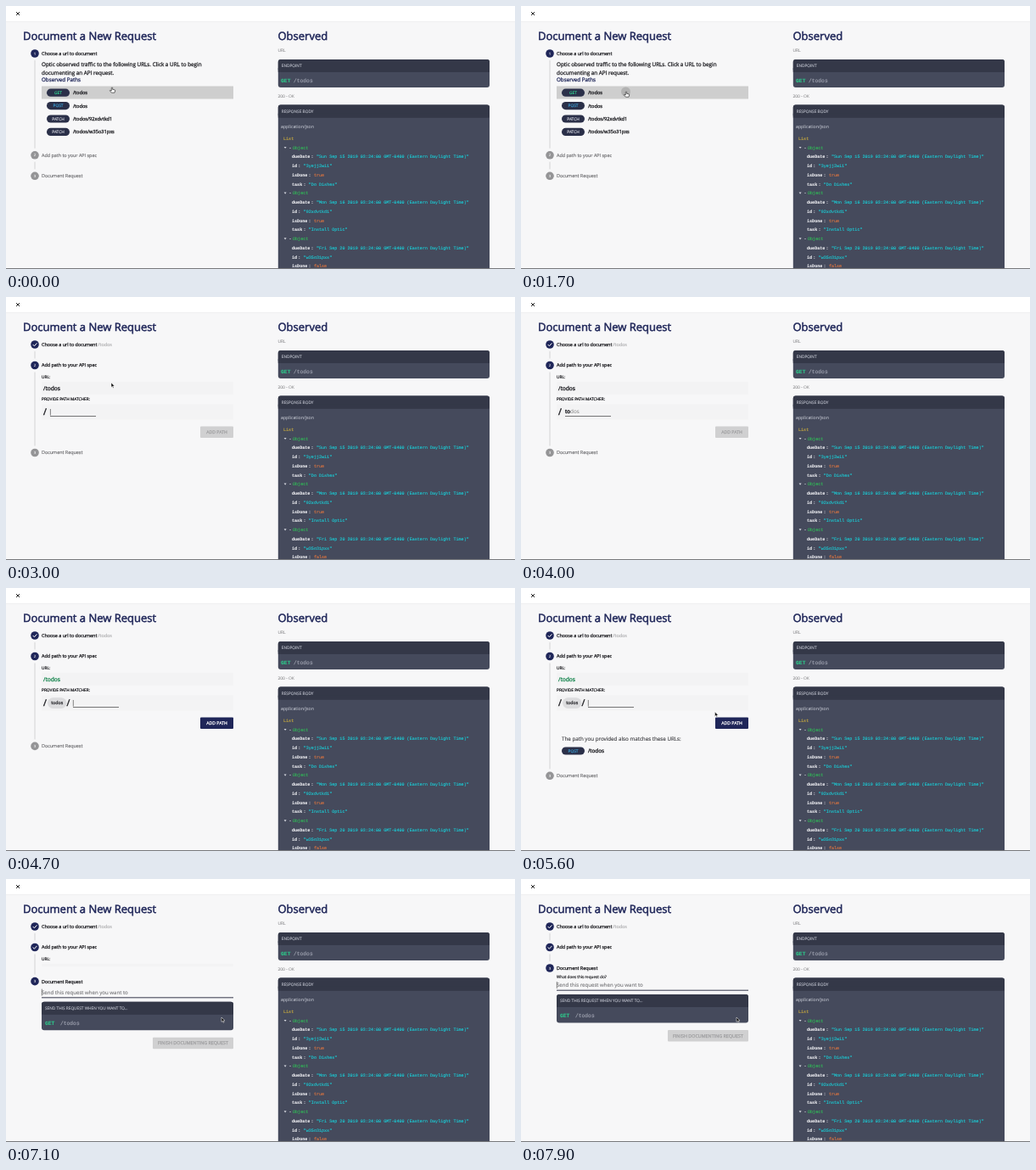
An HTML page for the animation above (8 s loop, 600 by 310 pixels).

```html
<!DOCTYPE html>
<html lang="en">
<head>
<meta charset="utf-8">
<title>Document a New Request</title>
<style>
  html, body { margin: 0; width: 100%; height: 100%; overflow: hidden; background: #f7f7f8; }
  svg { display: block; }
  text { font-family: "Open Sans", "Noto Sans", sans-serif; text-rendering: geometricPrecision; white-space: pre; }
  .mono { font-family: "Liberation Mono", monospace; }
</style>
</head>
<body>
<svg width="600" height="310" viewBox="0 0 600 310">
  <g id="fixed"></g>
  <g id="live"></g>
</svg>
<script>
const LOOP = 8000;
const NAVY = '#1f2659', INK = '#1c1c20', GREY = '#8e8e90', HEAD = '#343848', BODY = '#454a5c';
const FIELD = '#f3f3f4', GREEN = '#2fc48a', CYAN = '#19d3dc';

// Drawing helpers, each returning SVG markup
const rect = (x, y, w, h, fill, r = 0) =>
  `<rect x="${x}" y="${y}" width="${w}" height="${h}" rx="${r}" fill="${fill}"/>`;
const line = (d, color, w = 0.6) =>
  `<path d="${d}" stroke="${color}" stroke-width="${w}" fill="none"/>`;
const text = (x, y, size, fill, s, heavy = 2, attrs = '') =>
  `<text x="${x}" y="${y}" font-size="${size}" fill="${fill}" stroke="${fill}" stroke-width="${heavy * size / 100}" ${attrs}>${s}</text>`;
const mono = (x, y, size, fill, s, bold) =>
  text(x, y, size, fill, s, 2, `class="mono" font-weight="${bold ? 700 : 400}"`);
const centered = (x, y, size, fill, s, heavy) => text(x, y, size, fill, s, heavy, 'text-anchor="middle"');
const shift = (dy, content) => `<g transform="translate(0 ${dy})">${content}</g>`;
const clip = (y, h, content) => h <= 0 ? '' :
  `<svg y="${y}" width="300" height="${h}" viewBox="0 ${y} 300 ${h}">${content}</svg>`;

const ease = (t, from, to) => {
  const u = Math.min(1, Math.max(0, (t - from) / (to - from)));
  return u * u * (3 - 2 * u);
};

const card = (x, y, w, h, title) =>
  rect(x, y, w, h, BODY, 3) + rect(x, y, w, 15, HEAD, 3) + rect(x, y + 10, w, 5, HEAD) +
  text(x + 4, y + 9.3, 4.75, '#a9acb8', title, 4);

const chip = (y, method, color) =>
  rect(48, y - 4.6, 27, 9.2, '#2b3049', 4.6) + centered(61.5, y + 1.8, 4.8, color, method, 4);

const button = (x, y, w, label, size, active) =>
  rect(x, y, w, 13.5, active ? NAVY : '#d0d0d1', 1) +
  centered(x + w / 2, y + 8.7, size, active ? '#fff' : '#a0a0a2', label, 5);

function response() {
  const tasks = [
    ['Sun Sep 15', '3yejj2wi1', true, 'Do Dishes'],
    ['Mon Sep 16', '92xdvtkd1', true, 'Install Optic'],
    ['Fri Sep 20', 'w35o31pxs', false, '']
  ];
  let out = mono(327, 158, 5.08, '#d2b23c', 'List');
  let y = 168.7;
  for (const [day, id, done, task] of tasks) {
    out += `<path d="M327.6 ${y - 2.8}h3l-1.5 2.2z" fill="#d4d6de"/>` +
      mono(333.5, y, 5.08, '#f4f4f7', '-') + mono(338, y, 5.08, '#2fc457', 'Object');
    const fields = {
      dueDate: `"${day} 2019 03:24:00 GMT-0400 (Eastern Daylight Time)"`,
      id: `"${id}"`, isDone: done, task: task && `"${task}"`
    };
    for (const [key, value] of Object.entries(fields)) {
      y += 10.74;
      if (value === '') continue;
      const end = 337 + key.length * 3.05;
      out += mono(337, y, 5.08, '#f4f4f7', key, true) + mono(end + 1.2, y, 5.08, '#f4f4f7', ':', true) +
        mono(end + 7.6, y, 5.08, key === 'isDone' ? '#e8793f' : CYAN, value);
    }
    y += 10.74;
  }
  return out;
}

function fixedParts() {
  return rect(0, 0, 600, 310, '#f7f7f8') + rect(0, 0, 600, 18.5, '#fff') +
    line('M0 18.5H600', '#ececee', 0.7) +
    line('M12 7l4 4m0-4l-4 4', '#111', 0.9) +
    text(20, 39.6, 13, NAVY, 'Document a New Request', 4) +
    text(320.5, 39.6, 13, NAVY, 'Observed', 4) +
    text(320.5, 54.2, 4.8, GREY, 'URL') +
    card(320.8, 63, 249.2, 33, 'ENDPOINT') +
    mono(324, 90.2, 6.4, GREEN, 'GET', true) + mono(339, 90.2, 6.3, '#a0a4b2', '/todos') +
    text(320.5, 107.8, 4.9, GREY, '200 - OK') +
    card(320.8, 116.6, 249.2, 200, 'RESPONSE BODY') +
    text(324, 143.7, 5.22, '#b9bcc7', 'application/json') +
    response() + rect(0, 309, 600, 1, '#77787c');
}

function step(n, y, label, state) {
  const on = state !== 'idle';
  const mark = state === 'done'
    ? line(`M31.7 ${y}l1.7 1.8 3-3.4`, '#fff', 1)
    : centered(34, y + 1.6, 4.4, '#fff', n);
  return `<circle cx="34" cy="${y}" r="4.8" fill="${on ? NAVY : '#949496'}"/>` + mark +
    text(42, y + 1.9, 5.42, on ? INK : '#6f6f72', label, on ? 5 : 3);
}

const caret = (x, y, h, t, start) =>
  (t - start) % 1000 < 500 ? line(`M${x} ${y}v${h}`, '#333', 0.6) : '';

function pathList(t) {
  const rows = [['GET', GREEN, '/todos'], ['POST', '#3a9bd0', '/todos'],
    ['PATCH', '#c3c5d0', '/todos/92xdvtkd1'], ['PATCH', '#c3c5d0', '/todos/w35o31pxs']];
  const grow = ease(t, 1500, 1700);
  return text(42, 70.8, 6.34, INK, 'Optic observed traffic to the following URLs. Click a URL to begin', 4) +
    text(42, 81.2, 6.34, INK, 'documenting an API request.', 4) +
    text(42, 89.1, 6.25, NAVY, 'Observed Paths', 4) +
    rect(42, 94.5, 226, 15, '#cecece') +
    (grow ? `<circle cx="123.5" cy="101" r="${5.5 * grow}" fill="#b2b2b2"/>` : '') +
    rows.map(([method, color, path], i) => {
      const y = 102.2 + i * 15.4;
      return chip(y, method, color) + text(79, y + 2, 5.65, INK, path, 5);
    }).join('');
}

function pathForm(t) {
  const matched = t >= 4600;
  const typed = [3600, 3900, 4200, 4300, 4450].filter(k => t >= k).length;
  const word = 'todos', x = matched ? 79 : 52;
  const slash = x => text(x, 139.4, 10.5, INK, '/', 4);
  let out = text(42, 95.9, 4.75, INK, 'URL:', 5) + rect(42, 100, 226, 15, FIELD) +
    text(44, 109.8, 6.6, matched ? '#17864f' : INK, '/todos', 5) +
    text(42, 122.4, 4.8, INK, 'PROVIDE PATH MATCHER:', 5) + rect(42, 126.5, 226, 18, FIELD) +
    slash(44) + line(`M${x} 140.5h54`, '#555', 0.8);
  if (matched) {
    out += rect(49, 129.3, 22.5, 12.6, '#dcdcde', 6.3) + centered(60.2, 137.4, 5.3, INK, word, 4) +
      slash(71.5) + caret(79.3, 132, 7.5, t, 4600);
  } else if (typed) {
    out += text(52, 137.4, 6.3, INK,
      `${word.slice(0, typed)}<tspan fill="#777" stroke="none">${word.slice(typed)}</tspan>`, 6);
  } else {
    out += caret(52.4, 132, 7.5, t, 2000);
  }
  return out + button(229, 152.4, 39, 'ADD PATH', 5.2, matched) + (matched
    ? text(48, 180.4, 6.24, '#3a3a3e', 'The path you provided also matches these URLs:') +
      chip(192, 'POST', '#3a9bd0') + text(79, 194.2, 6.3, INK, '/todos', 5)
    : '');
}

function requestForm(t) {
  const label = ease(t, 7100, 7300);
  return (label ? `<g opacity="${label}">${text(42, 117.2, 4.65, INK, 'What does this request do?', 4)}</g>` : '') +
    shift(-7 * (1 - label),
      text(42, 127.2, 6.1, '#77777a', 'Send this request when you want to') +
      caret(42.3, 121, 8, t, 6900) + line('M42 131.2h226', '#33364a', 1) +
      card(42, 136, 226, 33.5, 'SEND THIS REQUEST WHEN YOU WANT TO...') +
      mono(46, 163.2, 6.3, GREEN, 'GET', true) + mono(64, 163.2, 6.3, '#a0a4b2', '/todos') +
      button(173, 178, 95, 'FINISH DOCUMENTING REQUEST', 5.4, false));
}

function steps(t) {
  const first = 95.3 * (1 - ease(t, 1750, 2050));
  const second = (78.5 * ease(t, 1750, 2050) + 37.8 * ease(t, 4650, 4950)) * (1 - ease(t, 6850, 7176));
  const third = 90 * ease(t, 6850, 7080);
  const y2 = 80.5 + first, y3 = y2 + 24.5 + second;
  const chosen = t >= 1750, added = t >= 6850;
  return line(`M34 64V${y2 - 8}M34 ${y2 + 8}V${y3 - 8}`, '#bcbcbe') +
    step(1, 56, 'Choose a url to document', chosen ? 'done' : 'active') +
    (chosen ? text(108.5, 57.9, 5.42, '#a4a4a6', '/todos') : '') +
    clip(61, first, pathList(t)) +
    step(2, y2, 'Add path to your API spec', added ? 'done' : chosen ? 'active' : 'idle') +
    shift(first, clip(87.5, second, pathForm(t))) +
    step(3, y3, 'Document Request', added ? 'active' : 'idle') +
    shift(y3 - 105, clip(112, third, requestForm(t)));
}

function pointer(t) {
  if (t >= 3500 && t < 5100) return '';
  const stops = [[0, 125, 96], [1300, 125, 96], [1650, 124, 101], [5150, 124, 101],
    [5600, 228.5, 146], [6200, 254, 163], [LOOP, 254, 163]];
  const i = stops.findIndex(s => s[0] > t);
  const [t0, x0, y0] = stops[i - 1], [t1, x1, y1] = stops[i];
  const u = ease(t, t0, t1), x = x0 + (x1 - x0) * u, y = y0 + (y1 - y0) * u;
  const hand = t < 1800 || (y > 152.5 && t < 6950);
  const shape = hand
    ? '<path d="M-.7 .4Q0-.6 .7 .4V2.4L3 2.8Q3.9 3 3.7 4L3 6.2H-.6L-2.7 3.7Q-2.5 2.7-.7 3.9Z" fill="#fff" stroke="#222" stroke-width=".65"/>'
    : '<path d="M0 0V5.4L1.3 4.3 2.2 6.3 3.1 5.9 2.2 4 4 3.9Z" fill="#111" stroke="#fff" stroke-width=".5"/>';
  return `<g transform="translate(${x} ${y})">${shape}</g>`;
}

const live = document.getElementById('live');
document.getElementById('fixed').innerHTML = fixedParts();

function frame() {
  const t = performance.now() % LOOP;
  live.innerHTML = steps(t) + pointer(t);
  requestAnimationFrame(frame);
}
frame();
</script>
</body>
</html>
```
